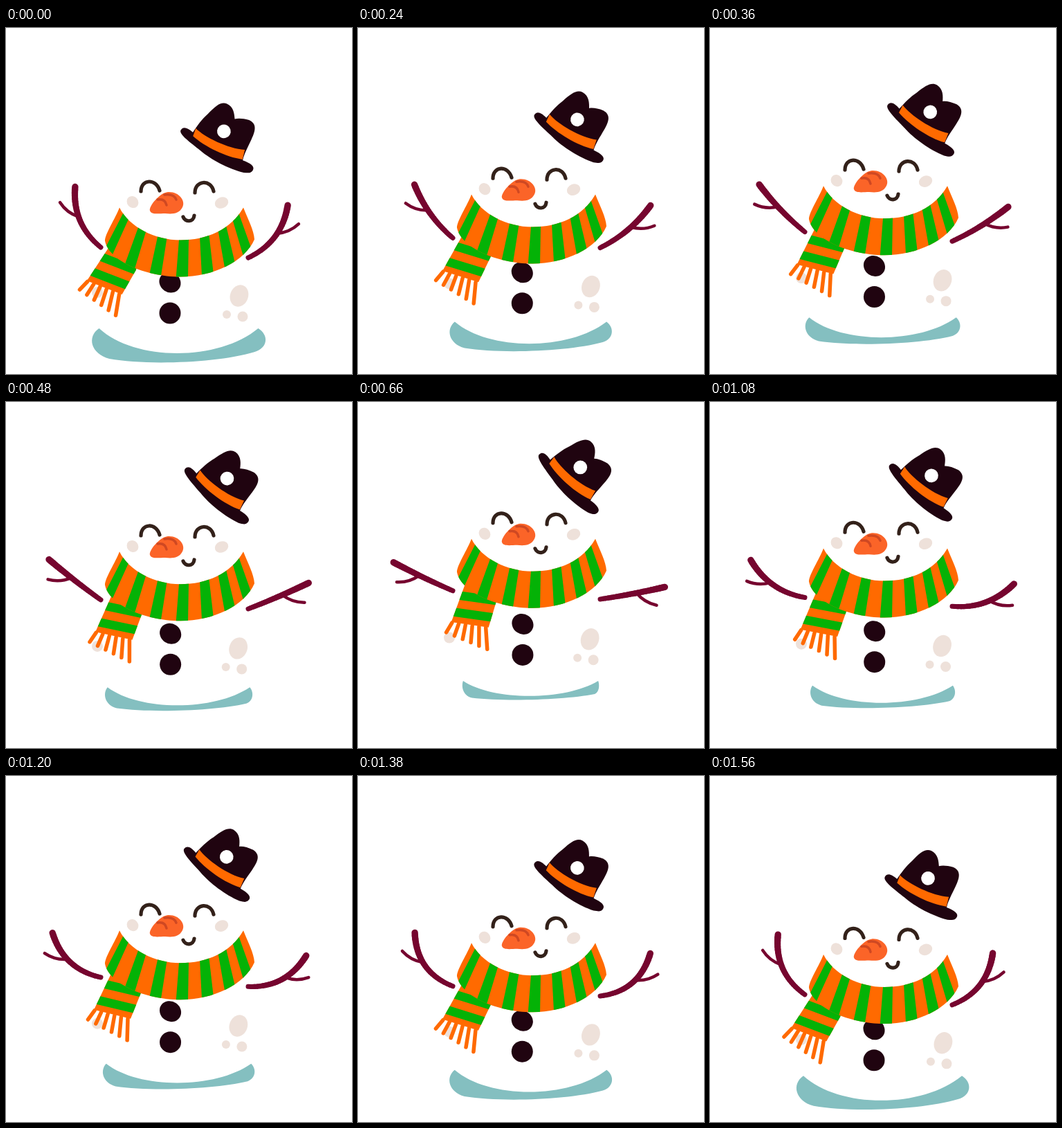
An HTML page with a canvas that plays this animation: 500 by 500 pixels, repeating every 1.62 s.

```html
<!DOCTYPE html>
<html lang="en">
<head>
<meta charset="utf-8">
<title>Bouncing snowman</title>
<style>
  html, body { margin: 0; width: 100%; height: 100%; overflow: hidden; background: #fff; }
  canvas { display: block; width: 500px; height: 500px; }
</style>
</head>
<body>
<canvas id="stage"></canvas>
<script>
const LOOP = 1620, STEP = 60, RISE = 800, PEAK = 1.075;
const INK = '#200410', BROWN = '#33211a', ORANGE = '#ff6a00', GREEN = '#04b206',
      BEIGE = '#eee1da', TEAL = '#84bfc0', TWIG = '#76052f';

const canvas = document.getElementById('stage');
const ratio = window.devicePixelRatio || 1;
canvas.width = canvas.height = 500 * ratio;
const ctx = canvas.getContext('2d');
ctx.scale(ratio, ratio);
ctx.lineCap = ctx.lineJoin = 'round';

const NOSE = new Path2D('M208 264C206 258 222 238 234 237C250 236 260 250 255 259C250 269 240 269 230 268C220 268 210 270 208 264Z');
const NOSE_LINES = new Path2D('M219 248Q230 246 232 256M229 241Q243 239 246 248');
const FACE_LINES = new Path2D('M195 236C195 218 217 217 222 235M273 238C273 220 296 218 300 236M256 273C259 281 271 281 272 271');
const COLLAR = new Path2D('M164 194C158 210 143 232 143 242C148 270 200 294 252 294C300 294 345 272 359 240C358 226 350 212 343 194C325 226 290 241 252 241C215 241 178 222 164 194Z');
const TAIL = new Path2D('M-20 -10L24 -5L23 21L12 60L-42 53Z');
const HAT = new Path2D('M-60 3C-60 -4 -53 -5 -43 -3C-42 -14 -41 -26 -37 -37C-33 -54 -29 -63 -20 -64C-9 -65 -3 -56 1 -50C5 -54 12 -57 20 -59C32 -60 36 -52 37 -36C38 -24 38 -12 41 -3C53 -5 61 -4 61 2C61 8 57 9 51 12C30 18 0 19 -20 15C-38 12 -60 10 -60 3Z');
const HAT_BAND = new Path2D('M-42 -10C-25 -5 14 -7 36 -18L40 -4C18 5 -18 7 -40 2Z');

const mix = (a, b, k) => a + (b - a) * k;
const radians = degrees => degrees * Math.PI / 180;

// Steady travel with a short soft start and stop.
function glide(u, soft = .135) {
  if (u > 1 - soft) return 1 - glide(1 - u, soft);
  return u < soft ? u * u / (2 * soft * (1 - soft)) : (u - soft / 2) / (1 - soft);
}

// Height of the bounce: 0 is squashed, about 1 is stretched.
const lift = t => PEAK * glide(t < RISE ? t / RISE : (LOOP - t) / (LOOP - RISE));

// Arms are straight on the way up and bow on the way down.
const armBend = t => 16 + 15 * Math.cos(2 * Math.PI * (t - 1380) / LOOP);

function fill(color, path) {
  ctx.fillStyle = color;
  ctx.fill(path);
}

function stroke(color, width, path) {
  ctx.strokeStyle = color;
  ctx.lineWidth = width;
  ctx.stroke(path);
}

function line(color, width, x0, y0, x1, y1) {
  const path = new Path2D();
  path.moveTo(x0, y0);
  path.lineTo(x1, y1);
  stroke(color, width, path);
}

function blob(color, x, y, rx, ry = rx, turn = 0) {
  const path = new Path2D();
  path.ellipse(x, y, rx, ry, turn, 0, 7);
  fill(color, path);
}

function placed(x, y, degrees, draw) {
  ctx.save();
  ctx.translate(x, y);
  ctx.rotate(radians(degrees));
  draw();
  ctx.restore();
}

// Side is -1 for the left arm and 1 for the right one.
function drawArm(side, x, y, raise, bend) {
  const length = 95, fork = .56, twig = 34, segments = 24;
  const pointAt = s => [length * s, 2 * s * (1 - s) * bend];
  placed(x, y, 0, () => {
    ctx.scale(side, 1);
    ctx.rotate(radians(-raise));
    for (let i = 0; i < segments; i++) {
      const s = i / segments;
      line(TWIG, mix(7, 9.5, s), ...pointAt(s), ...pointAt(s + 1 / segments));
    }
    const [forkX, forkY] = pointAt(fork);
    placed(forkX, forkY, 43 - .55 * bend, () => {
      const path = new Path2D();
      path.moveTo(0, 0);
      path.quadraticCurveTo(twig / 2, 6, twig, 0);
      stroke(TWIG, 4.5, path);
    });
  });
}

function drawBase(p) {
  const w = mix(115, 96.5, p), sag = mix(48, 28, p), bulge = mix(12, 1, p);
  const depth = mix(49, 26, p);
  placed(249.5, mix(434, 401, p), 0, () => {
    const path = new Path2D();
    path.moveTo(-w, 0);
    path.bezierCurveTo(-w * .55, sag, w * .5, sag, w, 0);
    path.bezierCurveTo(w + bulge * 1.3, depth * .2, w + bulge * 1.2, depth * .58, w * .95, depth * .7);
    path.bezierCurveTo(w * .5, depth * 1.02, -w * .4, depth * 1.1, -w * .87, depth * .9);
    path.bezierCurveTo(-w - bulge, depth * .75, -w - bulge * 1.5, depth * .25, -w, 0);
    fill(TEAL, path);
  });
}

function drawBody(p) {
  placed(-2 * p, -47 * p, 0, () => {
    blob(BEIGE, 337, 387, 13, 16, .35);
    blob(BEIGE, 319, 414, 6);
    blob(BEIGE, 342, 417, 7.5);
  });
  blob(BEIGE, 132, mix(382, 338, p), 8);
  placed(p, -49.5 * p, 0, () => {
    blob(INK, 237, 367.5, 16, 14.5, .6);
    blob(INK, 237, 412, 15.5);
  });
}

function drawTail() {
  for (let i = 0; i < 6; i++) {
    const x = -41 + 9.8 * i, y = 54 + 1.3 * i;
    line(ORANGE, 5.5, x, y, x - 8 + 2.1 * i, y + 14 + 3.4 * i);
  }
  fill(ORANGE, TAIL);
  ctx.clip(TAIL);
  for (const rise of [15, 40]) line(GREEN, 12.5, -50, 52 - rise, 30, 62 - rise);
}

// Stripes fan out from a point far above the collar.
function drawCollar() {
  fill(ORANGE, COLLAR);
  ctx.clip(COLLAR);
  const centerX = 268, centerY = 10, reach = 230, spread = 1.3;
  for (let k = -3; k <= 3; k++) {
    const offset = -11 + 31 * k - .8 * k * k;
    const path = new Path2D();
    path.moveTo(centerX, centerY);
    for (const edge of [-7, 7]) {
      path.lineTo(centerX + (offset + edge) * spread, centerY + reach * spread);
    }
    fill(GREEN, path);
  }
}

function drawScarf(p) {
  placed(mix(170.5, 178, p), mix(324, 262, p), mix(14, 0, p), drawTail);
  placed(0, 65.5 * (1 - p), 0, drawCollar);
}

function drawFace(p) {
  placed(0, -65 * p, 0, () => {
    blob(BEIGE, 183, 251.5, 8, 9, -.7);
    blob(BEIGE, 311.5, 252.5, 10, 8, -.4);
    fill('#fb6428', NOSE);
    stroke('#cf4822', 3.5, NOSE_LINES);
    stroke(BROWN, 5.2, FACE_LINES);
  });
}

function drawHat(p) {
  placed(305.5, mix(174, 112, p), mix(29.4, 46.3, p), () => {
    ctx.scale(.985, .985);
    fill(INK, HAT);
    fill(ORANGE, HAT_BAND);
    blob('#fff', -4, -26.5, 10);
  });
}

function render(now) {
  const t = Math.floor((now % LOOP) / STEP) * STEP;
  const p = lift(t), bend = armBend(t);
  ctx.fillStyle = '#fff';
  ctx.fillRect(0, 0, 500, 500);
  drawBase(p);
  drawBody(p);
  drawArm(-1, 137, mix(317, 270, p), 67 - 44 * p, bend);
  drawArm(1, 350, mix(332, 282, p), 53 - 45 * p, bend);
  drawScarf(p);
  drawFace(p);
  drawHat(p);
}

const start = performance.now();
function loop() {
  render(performance.now() - start);
  requestAnimationFrame(loop);
}
loop();
</script>
</body>
</html>
```
